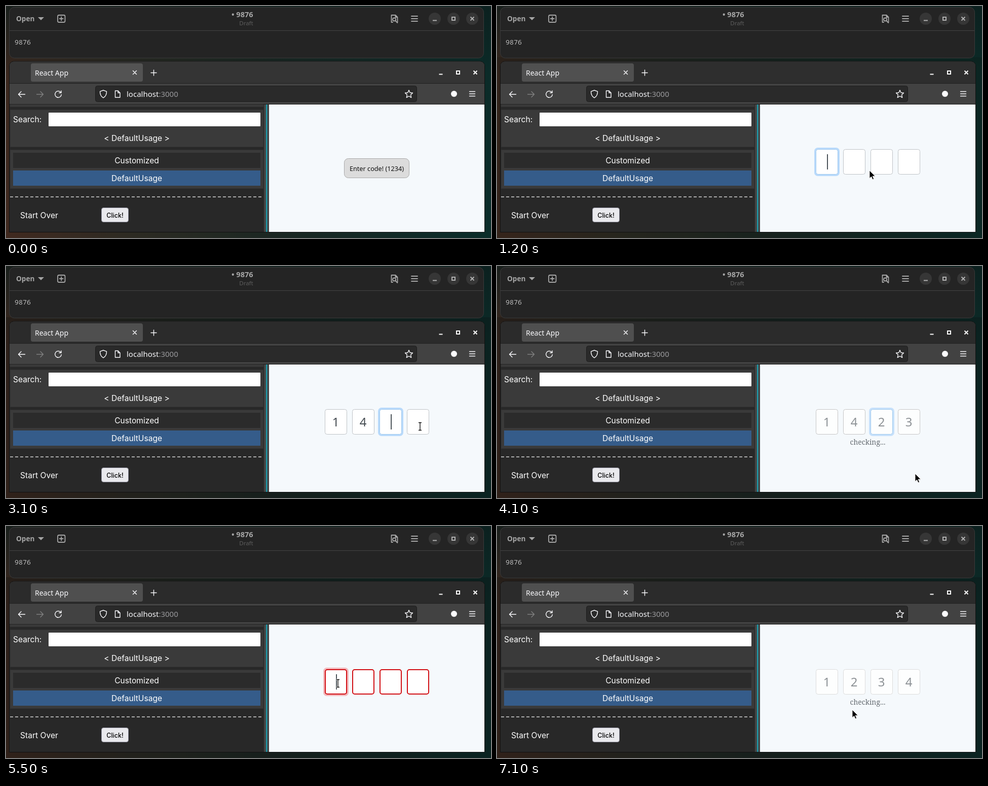
Animation of 957 by 457 pixels, one loop 8 s. Source, as an HTML page:

```html
<!DOCTYPE html>
<html lang="en">
<head>
<meta charset="utf-8">
<title>Code input demo</title>
<style>
  html, body { margin: 0; width: 100%; height: 100%; overflow: hidden; background: #15211f; }
  svg { display: block; }
  text { font-family: "Noto Sans", "Open Sans", sans-serif; white-space: pre; }
  .mid { text-anchor: middle; }
  .ui { font: 15.6px Inter, sans-serif; fill: #fff; }
  .head { font-weight: 700; fill: #a6a6a6; }
  .line { fill: none; stroke-linecap: round; stroke-linejoin: round; }
</style>
</head>
<body>
<svg width="957" height="457" viewBox="0 0 957 457">
  <defs>
    <linearGradient id="wall">
      <stop offset="0" stop-color="#40291f"/>
      <stop offset=".25" stop-color="#2d2a22"/>
      <stop offset=".55" stop-color="#1b2722"/>
      <stop offset="1" stop-color="#0b2d2a"/>
    </linearGradient>
    <linearGradient id="dusk" x2="0" y2="1">
      <stop offset="0" stop-color="#0c1c1b" stop-opacity=".75"/>
      <stop offset=".3" stop-color="#0c1c1b" stop-opacity=".1"/>
      <stop offset="1" stop-color="#0c1c1b" stop-opacity="0"/>
    </linearGradient>
  </defs>
  <rect width="957" height="457" fill="url(#wall)"/>
  <rect width="957" height="457" fill="url(#dusk)"/>
  <rect id="shade" y="101" width="957" height="356" fill="#0a0f0e" opacity="0"/>

  <!-- text editor -->
  <rect x="6.5" y="2.5" width="936" height="100" rx="10" fill="#242424" stroke="#3a3a3a"/>
  <path d="M7 48.5H942" stroke="#454545"/>
  <text class="head" x="20" y="30" font-size="13.6">Open</text>
  <path d="M63 22h12l-6 6z" fill="#a6a6a6"/>
  <text class="head" x="445" y="22" font-size="14.6">• 9876</text>
  <text class="mid" x="474" y="38" font-size="11.5" fill="#5e5e5e">Draft</text>
  <text x="17" y="76" font-size="13.3" fill="#bdbdbd" style="font-family:'Noto Sans Mono',monospace">9876</text>
  <g class="line" stroke="#a6a6a6" stroke-width="1.8">
    <rect x="102" y="18" width="14.5" height="14" rx="2.5"/>
    <path d="M109.2 21.5v7M105.7 25h7"/>
    <path d="M763 32h-2.5v-14h8l4 4v10M768.5 18v4h4"/>
    <circle cx="766" cy="26.5" r="3"/>
    <path d="M768.3 29l4 4M800 20h12M800 25h12M800 30h12"/>
  </g>
  <g fill="#363636">
    <circle cx="846" cy="25" r="12"/><circle cx="883" cy="25" r="12"/><circle cx="920" cy="25" r="12"/>
  </g>
  <g fill="none" stroke="#b0b0b0" stroke-width="2">
    <path d="M842 28.5h8M916.5 21.5l7 7M923.5 21.5l-7 7"/>
    <rect x="880" y="22" width="6" height="6"/>
  </g>

  <!-- browser window -->
  <path d="M6.5 445.5V118a9 9 0 0 1 9-9h920a9 9 0 0 1 9 9v327.500z" fill="#424242" stroke="#111"/>
  <path id="bar" d="M7 152V118a8.500 8.500 0 0 1 8.500-8.500h920a8.500 8.500 0 0 1 8.500 8.500v34z"/>
  <path d="M7 152.500H944" stroke="#202020"/>
  <rect id="tab" x="49" y="113" width="221" height="36" rx="4"/>
  <text x="57" y="136.500" font-size="14" fill="#fbfbfe">React App</text>
  <rect x="176.500" y="157.500" width="634" height="31" rx="4" fill="#2a2a2a" stroke="#1d1d1d"/>
  <text x="238" y="179" font-size="15" fill="#fbfbfe">localhost<tspan fill="#9a9a9d">:3000</tspan></text>
  <g class="line" stroke="#fbfbfe" stroke-width="1.4">
    <path d="M250.500 127.500l7 7M257.500 127.500l-7 7M286 131.500h11M291.500 126v11"/>
    <path d="M24.500 174h13M30 168.500l-5.500 5.500 5.500 5.500"/>
    <path d="M60.500 174h13M68 168.500l5.500 5.500-5.500 5.500" stroke="#808080"/>
    <path d="M108 170a6.300 6.300 0 1 0 1.300 4.500M109 167v4h-4.200"/>
    <path d="M192 166l6.500 2.300c0 6-1.500 10-6.500 12.500c-5-2.500-6.500-6.500-6.500-12.500z"/>
    <path d="M215.500 167h5.500l4 4v9h-9.500zM221 167v4h4"/>
    <path d="M795 165.800l2.200 5 5.300.500-4 3.600 1.200 5.400-4.700-2.800-4.700 2.800 1.200-5.400-4-3.600 5.300-.500z"/>
    <path d="M914.500 168.500h11M914.500 173h11M914.500 177.500h11"/>
  </g>
  <circle cx="884" cy="173" r="6" fill="#fbfbfe"/>
  <g fill="none" stroke="#fff" stroke-width="2">
    <path d="M854.500 134.500h7M922.500 127.500l7 7M929.500 127.500l-7 7"/>
    <rect x="889" y="128" width="6" height="6"/>
  </g>

  <!-- left panel -->
  <path d="M7 193.500H944" stroke="#1b1b1b"/>
  <rect x="7" y="194" width="502" height="251" fill="#282828"/>
  <g fill="#3a3a3a" stroke="#333">
    <path d="M8 194h500v4.500H8z"/>
    <rect x="8.500" y="204.500" width="499" height="73"/>
    <rect x="8.500" y="283.500" width="499" height="76"/>
  </g>
  <rect x="84" y="210" width="418" height="27" rx="1" fill="#fff"/>
  <rect x="14" y="289" width="488" height="30" fill="#2b2b2b"/>
  <rect x="14" y="324" width="488" height="30" fill="#355c8a"/>
  <text class="ui" x="14" y="229">Search:</text>
  <text class="ui mid" x="258" y="265.500">&lt; DefaultUsage &gt;</text>
  <text class="ui mid" x="258" y="309.500">Customized</text>
  <text class="ui mid" x="258" y="344.500">DefaultUsage</text>
  <path d="M8 376H508" stroke="#aaa" stroke-width="2" stroke-dasharray="6 4"/>
  <text class="ui" x="28" y="417.500">Start Over</text>
  <rect x="188.500" y="397.500" width="53" height="28" rx="4" fill="#e9e9ed" stroke="#8f8f9d"/>
  <text class="mid" x="215" y="416.500" style="font:500 12.500px Inter,sans-serif">Click!</text>

  <!-- divider and preview -->
  <rect x="509" y="194" width="10" height="251" fill="#444"/>
  <rect x="513" y="194" width="2.500" height="251" fill="#1d9bab"/>
  <rect x="519" y="194" width="425" height="251" fill="#f5f9fc"/>
  <g id="button">
    <rect x="667.500" y="300.500" width="128" height="38" rx="8" fill="#dcdcdc" stroke="#a9a9a9"/>
    <text class="mid" x="731.500" y="325" font-size="12.700" fill="#111">Enter code! (1234)</text>
  </g>
  <g id="fields"></g>
  <text id="status" class="mid" x="731.500" y="352" font-size="14" fill="#656b71" style="font-family:'Noto Serif',serif">checking...</text>

  <g id="cursor">
    <path id="arrow" d="M0 0V15.500L3.600 12.200 6 17.800 8.600 16.700 6.200 11.200H11.200Z" fill="#000" stroke="#fff" stroke-width=".9"/>
    <path id="hand" d="M-1.500 0q1.500-1 3 0v5.500h4.500q3 .5 3 3.500l-1 5.500H-2l-4-6q0-2 2-1.500l2.500 2z" fill="#000" stroke="#fff"/>
    <g id="beam" fill="none">
      <path d="M-3-7.500H3M0-7.500V7.500M-3 7.500H3" stroke="#fff" stroke-width="3.500"/>
      <path d="M-3-7.500H3M0-7.500V7.500M-3 7.500H3" stroke="#111" stroke-width="1.400"/>
    </g>
  </g>
</svg>
<script>
const LOOP = 8000, STEP = 100;
const $ = id => document.getElementById(id);
const show = (el, on) => el.setAttribute("display", on ? "inline" : "none");
const set = (el, attrs) => { for (const k in attrs) el.setAttribute(k, attrs[k]); };
const clamp = v => Math.max(0, Math.min(1, v));
const grey = v => `rgb(${v},${v},${v})`;

function add(parent, tag, attrs) {
  const el = document.createElementNS("http://www.w3.org/2000/svg", tag);
  set(el, attrs);
  return parent.appendChild(el);
}

const fields = [0, 1, 2, 3].map(i => {
  const x = 629 + 54 * i, g = $("fields");
  return {
    ring: add(g, "rect", { x: x - 3, y: 279, width: 50, height: 56, rx: 7 }),
    box: add(g, "rect", { fill: "#fff", rx: 4 }),
    digit: add(g, "text", { x: x + 21.5, y: 316, "font-size": 24, class: "mid" }),
    caret: add(g, "rect", { x: x + 76 - 54 + .3, y: 292, width: 1.6, height: 30, fill: "#222b33" }),
    x
  };
});

// start time, digits, focused field, mode
const states = [
  [0, "    ", -1, "closed"],
  [1200, "    ", 0, "edit"],
  [2100, "1   ", 1, "edit"],
  [2300, "14  ", 2, "edit"],
  [3200, "14  ", 3, "edit"],
  [3600, "14 3", 2, "edit"],
  [4100, "1423", 2, "check"],
  [4700, "    ", 0, "retry"],
  [5800, "1   ", 1, "retry"],
  [6300, "12  ", 2, "retry"],
  [6700, "123 ", 3, "retry"],
  [6900, "1234", 3, "check"]
];

// time, x, y of the pointer tip
const path = [
  [300, 905, 328], [400, 858, 327], [500, 800, 326], [600, 762, 324], [800, 735, 324],
  [2600, 735, 324], [2900, 790, 320], [3100, 817, 316], [3200, 817, 316], [3500, 825, 409],
  [4600, 825, 409], [5100, 738, 362], [5500, 655, 310],
  [5700, 655, 310], [6600, 701, 362], [LOOP, 701, 362]
];

function pointer(t) {
  const n = Math.max(1, path.findIndex(p => p[0] > t));
  const [a, b] = [path[n - 1], path[n]];
  const k = clamp((t - a[0]) / (b[0] - a[0]));
  return [a[1] + (b[1] - a[1]) * k, a[2] + (b[2] - a[2]) * k];
}

function drawField(f, i, [start, code, focus, mode], t) {
  const checking = mode === "check", focused = i === focus;
  const fade = checking ? clamp((t - start) / 200) : 0;
  const bad = mode === "retry" && code[i] === " ";
  const inset = bad ? 1 : .5;
  set(f.ring, {
    fill: bad ? "#f3b9bd" : "#b9dafb",
    opacity: focused ? (checking ? .75 * (1 - fade) : 1) : 0
  });
  set(f.box, {
    x: f.x + inset, y: 282 + inset, width: 44 - 2 * inset, height: 50 - 2 * inset,
    stroke: bad ? "#d20f14" : focused && fade < 1 ? "#9fc9ee" : checking ? grey(198 + 22 * fade) : "#bfc3c7",
    "stroke-width": 2 * inset,
    fill: checking ? "#fdfefe" : "#fff"
  });
  f.digit.textContent = code[i].trim();
  set(f.digit, { fill: checking ? "#8c9195" : "#434a50" });
  show(f.caret, focused && !checking);
}

function draw(t) {
  const state = states.findLast(s => s[0] <= t);
  const closed = state[3] === "closed";
  const active = clamp((t - 1000) / 300);
  set($("bar"), { fill: grey(52 - 9 * active) });
  set($("tab"), { fill: grey(83 - 4 * active) });
  set($("shade"), { opacity: .3 * active });
  show($("button"), closed);
  show($("fields"), !closed);
  show($("status"), state[3] === "check");
  fields.forEach((f, i) => drawField(f, i, state, t));

  const [x, y] = pointer(t);
  const onButton = closed && x > 667 && x < 796 && y > 300 && y < 339;
  const onField = !closed && y > 282 && y < 332 && fields.some(f => x > f.x && x < f.x + 44);
  show($("cursor"), t >= 300);
  set($("cursor"), { transform: `translate(${Math.round(x)} ${Math.round(y)})` });
  show($("hand"), onButton);
  show($("beam"), onField);
  show($("arrow"), !onButton && !onField);
}

const origin = performance.now();
function tick() {
  const t = (performance.now() - origin) % LOOP;
  draw(Math.floor(t / STEP) * STEP);
  requestAnimationFrame(tick);
}
tick();
</script>
</body>
</html>
```
